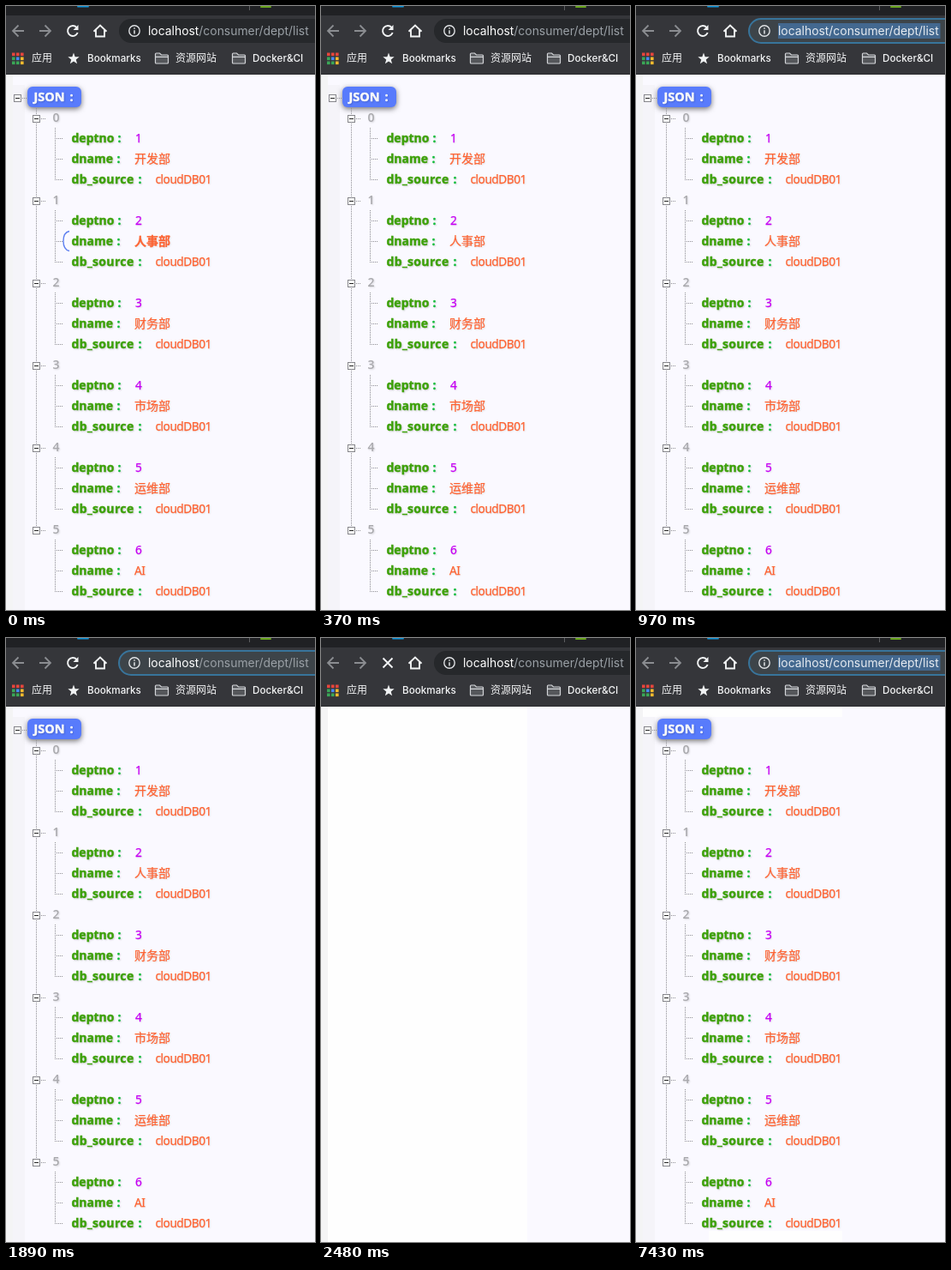
An HTML page for the animation above (8000 ms loop, 361 px wide and 704 px high).

```html
<!DOCTYPE html>
<html lang="zh-CN">
<head>
<meta charset="utf-8">
<title>Department list</title>
<style>
  html, body { margin: 0; width: 100%; height: 100%; overflow: hidden; background: #faf9ff; }
  svg { display: block; }
  text { white-space: pre; }
  .bar { font: 500 11.7px Inter, "Noto Sans CJK SC", "Noto Sans CJK", sans-serif; fill: #f4f5f6; }
  .cjk { font-size: 12px; }
  .url { font: 13.9px Inter, sans-serif; fill: #9aa0a6; }
  .host { fill: #fff; }
  .picked .url, .picked .host { fill: #e6ebf1; }
  .key, .colon, .index, .root {
    font: bold 14px "Open Sans", "Noto Sans", sans-serif;
    text-shadow: 1px 1px 2px rgba(0, 0, 0, .14);
    stroke-width: .45px;
  }
  .key { fill: #3fa50a; stroke: #3fa50a; }
  .wide { letter-spacing: .35px; }
  .colon { fill: #12bf3c; stroke: #12bf3c; }
  .index { fill: #a9a9ad; font-weight: 600; }
  .root { fill: #fff; stroke: #fff; font-size: 14.5px; }
  .num, .str {
    font: 13.7px "Noto Sans", "Open Sans", "Noto Sans CJK SC", "Noto Sans CJK", sans-serif;
    letter-spacing: -.5px;
    text-shadow: 1px 1px 2px rgba(0, 0, 0, .08);
    stroke-width: .25px;
  }
  .num { fill: #c800f5; stroke: #c800f5; }
  .str { fill: #ff6433; stroke: #ff6433; }
  .han { font-size: 14px; letter-spacing: 0; }
  .dots { stroke: #8d8d92; stroke-dasharray: 1 1; }
  .pill { filter: drop-shadow(0 2px 3px rgba(0, 0, 0, .55)); }
</style>
</head>
<body>
<svg id="stage" width="361" height="704" viewBox="0 0 361 704">
  <rect width="361" height="704" fill="#faf9ff"/>
  <rect y="80" width="8" height="624" fill="#f4f4f5"/>
  <g id="residue" fill="#fefefe">
    <rect x="8" y="80" width="233" height="12"/>
    <rect x="85" y="691" width="156" height="13"/>
  </g>
  <g id="page">
    <rect x="8" y="92" width="14" height="612" fill="#f5f4f9"/>
    <rect class="pill" x="25" y="94" width="63" height="24" rx="6" fill="#587bfc"/>
    <text class="root" x="32.5" y="111">JSON</text>
    <text class="root" x="74.5" y="111">:</text>
    <path id="halo" d="M74 262.5Q67 264 67 274T74 285.5" fill="none" stroke="#5d7ff0" stroke-width="1.4"/>
  </g>
  <rect id="blank" x="8" y="80" width="233" height="624" fill="#fefefe"/>

  <rect width="361" height="80" fill="#35363a"/>
  <rect width="361" height="11" fill="#202124"/>
  <rect x="83" width="14" height="1.5" rx="1" fill="#1296db"/>
  <rect x="284" width="1" height="5" fill="#5c5d61"/>
  <rect x="297" width="13" height="2" rx="1" fill="#6aa51e"/>
  <rect y="79" width="361" height="1" fill="#2a2b2e"/>

  <g fill="none" stroke="#8b8d91" stroke-width="1.8">
    <path d="M21 29H8.5M14.5 22.5L8 29L14.5 35.5"/>
    <path d="M39 29H51.5M45.5 22.5L52 29L45.5 35.5"/>
  </g>
  <g fill="none" stroke="#f1f3f4" stroke-width="1.9">
    <g id="reload">
      <path d="M82.6 25A6 6 0 1 0 83.7 31"/>
      <path d="M84.5 22V28H78.5Z" fill="#f1f3f4" stroke="none"/>
    </g>
    <path id="stop" d="M72.5 23.5L83.5 34.5M83.5 23.5L72.5 34.5"/>
    <path d="M102.5 29.7L110 22.5L117.5 29.7M105 28V35.5H115V28"/>
  </g>

  <rect x="132" y="15" width="260" height="28" rx="14" fill="#26282b"/>
  <rect id="ring" x="132" y="15" width="260" height="28" rx="14" fill="#3d4449" stroke="#38749b" stroke-width="2"/>
  <circle cx="150" cy="29" r="6.2" fill="none" stroke="#e0e2e5" stroke-width="1.4"/>
  <path d="M150 28.2V32.5M150 25.2V26.8" stroke="#e0e2e5" stroke-width="1.5"/>
  <rect id="select" x="166" y="20" width="189.5" height="18" fill="#43688f"/>
  <g id="address"><text class="url" x="166" y="34"><tspan class="host">localhost</tspan>/consumer/dept/list</text></g>
  <rect id="caret" x="355" y="20" width="1" height="17" fill="#fff"/>

  <g id="apps"></g>
  <path id="star" fill="#f1f3f4"/>
  <g id="folders" fill="#55575b" stroke="#d4d6d9" stroke-width="1.2"></g>
  <text class="bar cjk" x="30" y="65.3">应用</text>
  <text class="bar" x="95" y="65">Bookmarks</text>
  <text class="bar cjk" x="198" y="65.3">资源网站</text>
  <text class="bar" x="288" y="65">Docker&amp;CI</text>
</svg>
<script>
const $ = id => document.getElementById(id);
const NS = "http://www.w3.org/2000/svg";

function add(parent, tag, attrs, label) {
  const el = document.createElementNS(NS, tag);
  for (const k in attrs) el.setAttribute(k, attrs[k]);
  if (label !== undefined) el.textContent = label;
  parent.append(el);
  return el;
}

const page = $("page");
const text = (cls, x, y, label) => add(page, "text", { class: cls, x, y }, label);
const dots = d => add(page, "path", { class: "dots", d });

function toggle(x, y) {
  add(page, "rect", { x: x - 4, y: y - 4, width: 8, height: 8, fill: "#fff", stroke: "#85858a" });
  add(page, "path", { d: `M${x - 2.5} ${y}h5`, stroke: "#222" });
}

function field(y, key, colonX, valueX, value, cls) {
  dots(`M57 ${y + .5}H67`);
  text(key === "db_source" ? "key wide" : "key", 76.5, y + 5, key);
  text("colon", colonX, y + 5, ":");
  return text(cls, valueX, y + 5, value);
}

// Tree
dots("M19 107.5H25");
dots("M35.5 119V611");
toggle(13.5, 107.5);
const names = ["开发部", "人事部", "财务部", "市场部", "运维部", "AI"].map((name, i) => {
  const y = 130 + 96 * i;
  dots(`M41 ${y + 1.5}H46`);
  toggle(35.5, y + 1.5);
  text("index", 54.5, y + 5, i);
  dots(`M57.5 ${y + 12}V${y + 73}`);
  field(y + 24, "deptno", 130.5, 151, i + 1, "num");
  const el = field(y + 48, "dname", 129.5, 150, name, name === "AI" ? "str" : "str han");
  field(y + 72, "db_source", 154.5, 174.5, "cloudDB01", "str");
  return el;
});

// Bookmark icons
const [red, green, blue, yellow] = ["#e8453c", "#3aa757", "#4688f1", "#f9bb2d"];
[red, red, red, green, blue, yellow, green, green, yellow].forEach((fill, i) =>
  add($("apps"), "rect", { x: 7 + i % 3 * 5, y: 54.5 + Math.floor(i / 3) * 5, width: 3.6, height: 3.6, fill }));

$("star").setAttribute("d", "M" + Array.from({ length: 10 }, (_, i) => {
  const r = i % 2 ? 2.9 : 7, a = i * Math.PI / 5;
  return `${(79 + r * Math.sin(a)).toFixed(2)} ${(61.5 - r * Math.cos(a)).toFixed(2)}`;
}).join("L") + "Z");

for (const x of [174.5, 264.5])
  add($("folders"), "path", { d: `M${x} 66V56q0-1 1-1h4l2 2h7q1 0 1 1v8q0 1-1 1h-13q-1 0-1-1ZM${x} 59.3h15` });

const show = (id, on) => { $(id).style.display = on ? "" : "none"; };
const within = (t, a, b) => t >= a && t < b;

function draw(t) {
  const selected = within(t, 970, 1380) || t >= 7430;
  const loading = within(t, 2370, 2600);
  const blank = within(t, 2480, 2570);
  // Hover outline fades in eight steps.
  const step = t < 30 ? 0 : Math.min(8, Math.floor((t - 30) / 340 * 7) + 1);

  $("halo").style.opacity = 1 - step / 8;
  names[1].style.fontWeight = t < 30 ? "bold" : "normal";
  show("ring", within(t, 940, 2370) || t >= 7430);
  show("select", selected);
  $("address").setAttribute("class", selected ? "picked" : "");
  show("caret", within(t, 1380, 1890));
  show("reload", !loading);
  show("stop", loading);
  show("page", !blank);
  show("blank", blank);
  show("residue", t >= 2570);
}

const start = performance.now();
function tick() {
  draw((performance.now() - start) % 8000);
  requestAnimationFrame(tick);
}
tick();
</script>
</body>
</html>
```
